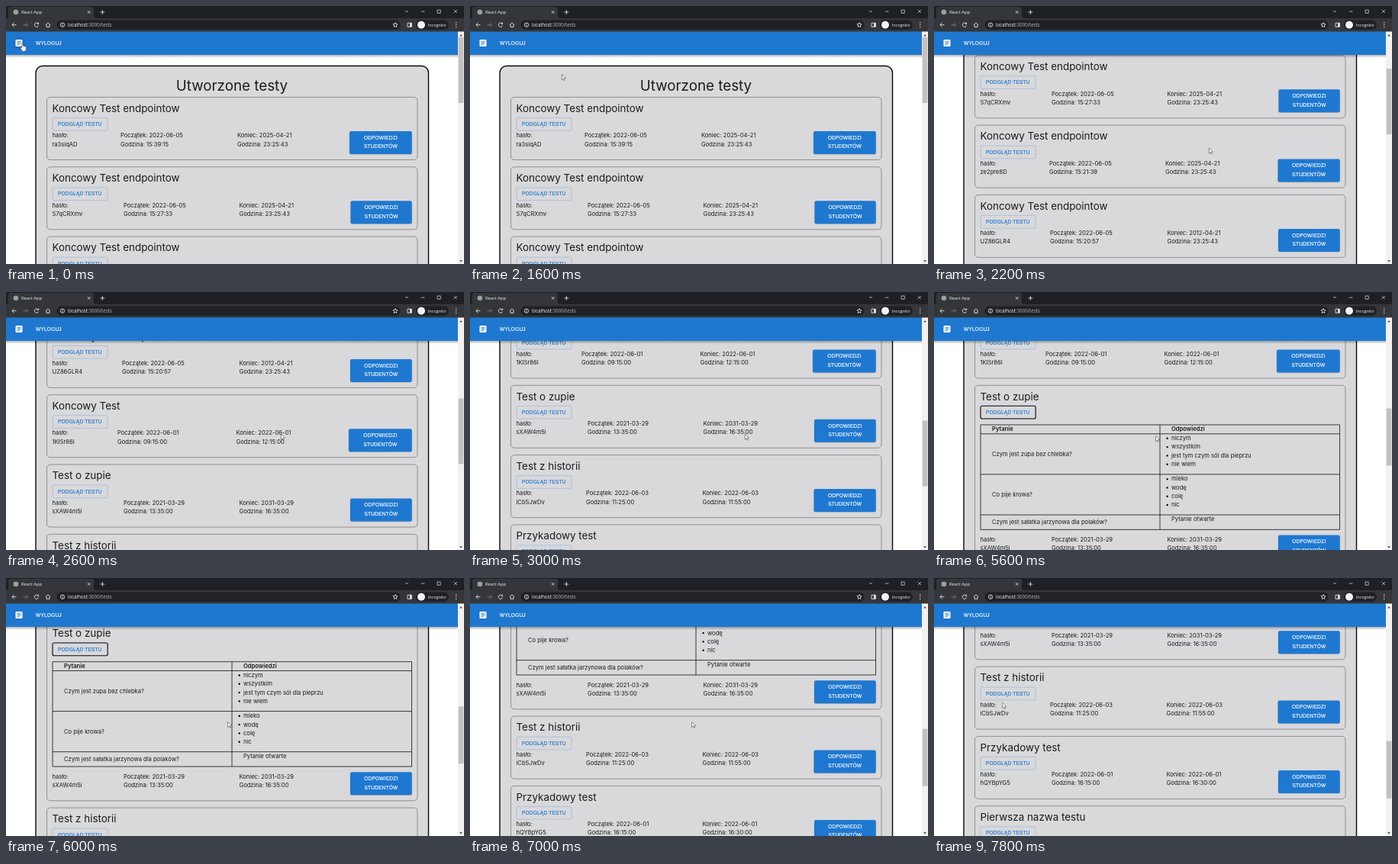
These frames come from a looping animation (600x338 px, 8000 ms). An HTML page:

```html
<!DOCTYPE html>
<html lang="pl">
<head>
<meta charset="utf-8">
<title>React App</title>
<style>
html, body { margin: 0; width: 100%; height: 100%; overflow: hidden; background: #fff; }
svg { display: block; width: 600px; height: 338px; }
text { font: 7.6px Inter, sans-serif; fill: #1c1c1c; }
.title { font-size: 18.8px; text-anchor: middle; }
.head { font-size: 13.4px; }
.bold { font-weight: 600; }
.cap { font: 6.56px "Liberation Sans", Arial, sans-serif; letter-spacing: .19px; fill: #fff; stroke: #fff; stroke-width: .16; }
.mid { text-anchor: middle; }
.blue { fill: #1976d2; stroke: #1976d2; }
.ui { font: 5.8px "Open Sans", sans-serif; fill: #f1f3f4; }
.url { font-size: 6.2px; }
.line { fill: none; stroke: #dfe1e5; stroke-width: .9; }
.grid { fill: none; stroke: #111; stroke-width: .8; }
.card { fill: #d9d8da; stroke: #555; stroke-width: .55; }
.pointer { fill: #fff; stroke: #333; stroke-width: .55; }
</style>
</head>
<body>
<svg id="stage" viewBox="0 0 600 338" xmlns="http://www.w3.org/2000/svg">
  <defs>
    <linearGradient id="shade" x2="0" y2="1">
      <stop stop-color="#000" stop-opacity=".3"/><stop offset="1" stop-color="#000" stop-opacity="0"/>
    </linearGradient>
  </defs>
  <rect width="600" height="338" fill="#fff"/>

  <g id="page">
    <rect x="39" y="78.5" width="514.5" height="1120" rx="9" fill="#d9d8da" stroke="#080808" stroke-width="1.4"/>
    <text class="title" x="296" y="110.7">Utworzone testy</text>
    <g id="cards"></g>
  </g>

  <rect y="64" width="592" height="4" fill="url(#shade)"/>
  <rect y="33" width="592" height="31" fill="#1f78d0"/>
  <circle id="hover" cx="17" cy="48.5" r="9" fill="#000" opacity=".06"/>
  <rect x="12.5" y="44" width="9" height="9" rx="1" fill="#fff"/>
  <path d="M14.4 46.6h5.2M14.4 48.5h5.2M14.4 50.4h3.4" stroke="#1f78d0" stroke-width=".9"/>
  <text class="cap" x="39.1" y="50.9">WYLOGUJ</text>

  <rect x="592" y="33" width="8" height="305" fill="#f1f1f1"/>
  <path d="M594 39.4l2-2.4 2 2.4zM594 333l2 2.4 2-2.4z" fill="#555"/>
  <rect id="thumb" x="592.7" width="6.6" fill="#c1c1c1"/>

  <rect width="600" height="17" fill="#1f2023"/>
  <path d="M0 16.5q3 0 3-3V4q0-3 3-3h106q3 0 3 3v9.5q0 3 3 3z" fill="#35363a"/>
  <rect y="16" width="600" height="17.5" fill="#35363a"/>
  <circle cx="13" cy="8" r="3.3" fill="#9aa0a6"/>
  <text class="ui" x="20" y="10.3">React App</text>
  <g class="line">
    <path d="M107 6.3l3.4 3.4m0-3.4l-3.4 3.4M123.5 8h5.6m-2.8-2.8v5.6"/>
    <path d="M523 6l2 2 2-2M543.8 7.2h4.6M565 5.1h4.2v4.2h-4.2zM586.7 5l4.3 4.3m0-4.3l-4.3 4.3" stroke-width=".7"/>
    <path d="M13.5 24.7h-5.5m2.6-2.7l-2.7 2.7 2.7 2.7"/>
    <path d="M23 24.7h5.5m-2.6-2.7l2.7 2.7-2.7 2.7" stroke="#77797d"/>
    <path d="M42.3 23.2a2.7 2.7 0 1 0 .3 2.4M42.6 21.6v2h-2"/>
    <path d="M52 24.8l3-2.9 3 2.9M53 24.2v3.3h4v-3.3"/>
  </g>
  <rect x="66.5" y="18.5" width="450" height="12.5" rx="6.2" fill="#202124"/>
  <g class="line" stroke-width=".7">
    <circle cx="74" cy="24.7" r="2.7"/><path d="M74 24.3v1.9M74 22.9v.7"/>
    <path d="M510 21.6l.9 2 2.2.2-1.7 1.5.5 2.2-1.9-1.1-1.9 1.1.5-2.2-1.7-1.5 2.2-.2z"/>
    <path d="M526 22.3h5.4v5h-5.4z"/>
  </g>
  <path d="M529 22.3h2.4v5H529z" fill="#dfe1e5"/>
  <text class="ui url" x="81" y="26.9">localhost<tspan fill="#b4b8bd">:3000/tests</tspan></text>
  <rect x="537" y="18.5" width="43" height="12.5" rx="6.2" fill="#202124"/>
  <circle cx="544" cy="24.7" r="5" fill="#f1f3f4"/>
  <text class="ui" x="552.7" y="26.7" style="font-size:5.5px">Incognito</text>
  <path d="M589.7 21.7h.01M589.7 24.7h.01M589.7 27.7h.01" stroke="#dfe1e5" stroke-width="1.4" stroke-linecap="round"/>

  <path id="arrow" class="pointer" d="M0 0v7l1.7-1.4 1.1 2.5 1.2-.5-1.1-2.5 2.2-.2z"/>
  <path id="hand" class="pointer" d="M0 0q.9-.8 1.5.3v3l3 .7q1.4.4 1.3 1.7l-.6 3.6q-.2 1-1 1h-2.6q-.8 0-1.3-.9l-2-3q-.5-1 .3-1.2l1.4.8z"/>
</svg>
<script>
const $ = id => document.getElementById(id);
const TOP = 119.5, PITCH = 91.3, HEIGHT = 82, EXTRA = 151.8, OPEN_CARD = 5;

// title, password, start, end, x of start, x of end, x of button
const tests = [
  ['Koncowy Test endpointow', 'ra3siqAD', '2022-06-05 15:39:15', '2025-04-21 23:25:43', 150, 303, 450],
  ['Koncowy Test endpointow', 'S7qCRXmv', '2022-06-05 15:27:33', '2025-04-21 23:25:43', 154, 305.5, 451.5],
  ['Koncowy Test endpointow', 'ze2pre8D', '2022-06-05 15:21:39', '2025-04-21 23:25:43', 151, 303, 450.5],
  ['Koncowy Test endpointow', 'UZ86GLR4', '2022-06-05 15:20:57', '2012-04-21 23:25:43', 152, 305.5, 451],
  ['Koncowy Test', '1KlSr86I', '2022-06-01 09:15:00', '2022-06-01 12:15:00', 146, 301.5, 449],
  ['Test o zupie', 'sXAW4m5i', '2021-03-29 13:35:00', '2031-03-29 16:35:00', 154, 305.5, 451],
  ['Test z historii', 'iCbSJwDv', '2022-06-03 11:25:00', '2022-06-03 11:55:00', 152, 304.5, 450.5],
  ['Przykadowy test', 'hQYBpYG5', '2022-06-01 16:15:00', '2022-06-01 16:30:00', 154, 304.5, 451],
  ['Pierwsza nazwa testu', 'mT4wKz2a', '2022-06-01 10:15:00', '2022-06-01 10:45:00', 152, 304.5, 451],
];

const text = (x, y, str, cls = '') => `<text x="${x}" y="${y}" class="${cls}">${str}</text>`;
const box = (x, y, w, h, r, style) => `<rect x="${x}" y="${y}" width="${w}" height="${h}" rx="${r}" ${style}/>`;
const pair = (x, first, second) => text(x, 52.8, first) + text(x, 64.1, second);

function period(x, label, stamp) {
  const [day, hour] = stamp.split(' ');
  return pair(x, `${label}: ${day}`, `Godzina: ${hour}`);
}

function bullets(y, items) {
  return items.map((s, i) =>
    `<circle cx="305.6" cy="${y + i * 11.3 - 2.4}" r="1.2"/>` + text(311, y + i * 11.3, s)).join('');
}

function answers() {
  return `<g id="table" transform="translate(0 -58)">
    <path class="grid" d="M61 109.7H531.5V247H61zM61 121.5H531.5M61 174.6H531.5M61 227.7H531.5M296 109.7V247"/>`
    + text(76, 118.2, 'Pytanie', 'bold') + text(311, 118.2, 'Odpowiedzi', 'bold')
    + text(76, 150.6, 'Czym jest zupa bez chlebka?')
    + text(76, 203.9, 'Co pije krowa?')
    + text(76, 240, 'Czym jest sałatka jarzynowa dla polaków?')
    + bullets(129.9, ['niczym', 'wszystkim', 'jest tym czym sól dla pieprzu', 'nie wiem'])
    + bullets(183.2, ['mleko', 'wodę', 'colę', 'nic'])
    + text(311, 236, 'Pytanie otwarte') + '</g>';
}

function card([title, pass, start, end, x1, x2, bx], i) {
  const right = 531.7, mid = (bx + right) / 2, w = right - bx, open = i === OPEN_CARD;
  return `<g class="row">${box(53.5, 0, 485.5, HEIGHT, 4.5, 'class="card"')}`
    + text(60.5, 19.3, title, 'head')
    + box(61, 27, 72, 16.7, 2, 'fill="none" stroke="#8fb3dc" stroke-width=".6"')
    + (open ? box(61, 27, 72.2, 16.7, 2, 'id="focus" fill="none" stroke="#111" stroke-width="1.1"') + answers() : '')
    + text(68, 37.6, 'PODGLĄD TESTU', 'cap blue')
    + '<g class="foot">' + pair(60.5, 'hasło:', pass)
    + period(x1, 'Początek', start) + period(x2, 'Koniec', end)
    + box(bx - .4, 45.2, w + .8, 30, 2.4, 'fill="#000" opacity=".2"')
    + box(bx, 44.5, w, 30, 2, 'fill="#1f78d0"')
    + text(mid, 55.4, 'ODPOWIEDZI', 'cap mid') + text(mid, 66.9, 'STUDENTÓW', 'cap mid') + '</g></g>';
}

$('cards').innerHTML = tests.map(card).join('');
const rows = [...document.querySelectorAll('.row')];
const openRow = rows[OPEN_CARD];

// time, scroll offset
const scroll = [[0, 0], [1800, 0], [2000, 50], [2200, 146], [2400, 250], [2600, 350], [2800, 430], [3000, 453.7],
  [5600, 453.7], [5800, 482], [6000, 518], [6200, 518], [6400, 555], [6600, 580], [6800, 600],
  [7000, 638], [7200, 682], [7400, 703], [8000, 703]];
// time, pointer x, pointer y
const pointer = [[0, 20.7, 49], [1400, 20.7, 49], [1800, 220, 130], [2000, 360.3, 186], [3800, 360.3, 186],
  [4400, 95.3, 160.2], [5200, 95.3, 160.2], [5600, 290.6, 188.5], [7400, 290.6, 188.5],
  [7800, 89.7, 163.3], [8000, 89.7, 163.3]];

function at(table, t, col = 1) {
  const i = table.findIndex(p => p[0] > t), a = table[i - 1], b = table[i];
  return a[col] + (b[col] - a[col]) * (t - a[0]) / (b[0] - a[0]);
}
const move = (el, x, y) => el.setAttribute('transform', `translate(${x} ${y})`);
const show = (el, on) => el.setAttribute('visibility', on ? 'visible' : 'hidden');

function draw(t) {
  const y = at(scroll, t), open = t >= 5000, grow = open ? EXTRA : 0;
  move($('page'), 0, -y);
  rows.forEach((row, i) => move(row, 0, TOP + i * PITCH + (i > OPEN_CARD ? grow : 0)));
  openRow.querySelector('.card').setAttribute('height', HEIGHT + grow);
  move(openRow.querySelector('.foot'), 0, grow);
  show($('table'), open);
  show($('focus'), t >= 4600);

  $('thumb').setAttribute('y', 41 + y * (open ? .2456 : .281));
  $('thumb').setAttribute('height', open ? 75 : 86);

  const onIcon = t < 1600, hand = onIcon || (t >= 4400 && t < 5400);
  show($('hover'), onIcon);
  show($('hand'), hand);
  show($('arrow'), !hand);
  move($(hand ? 'hand' : 'arrow'), at(pointer, t), at(pointer, t, 2));
}

let last = -1;
function tick() {
  const t = Math.floor(performance.now() % 8000 / 200) * 200;
  if (t !== last) draw(last = t);
  requestAnimationFrame(tick);
}
tick();
</script>
</body>
</html>
```
